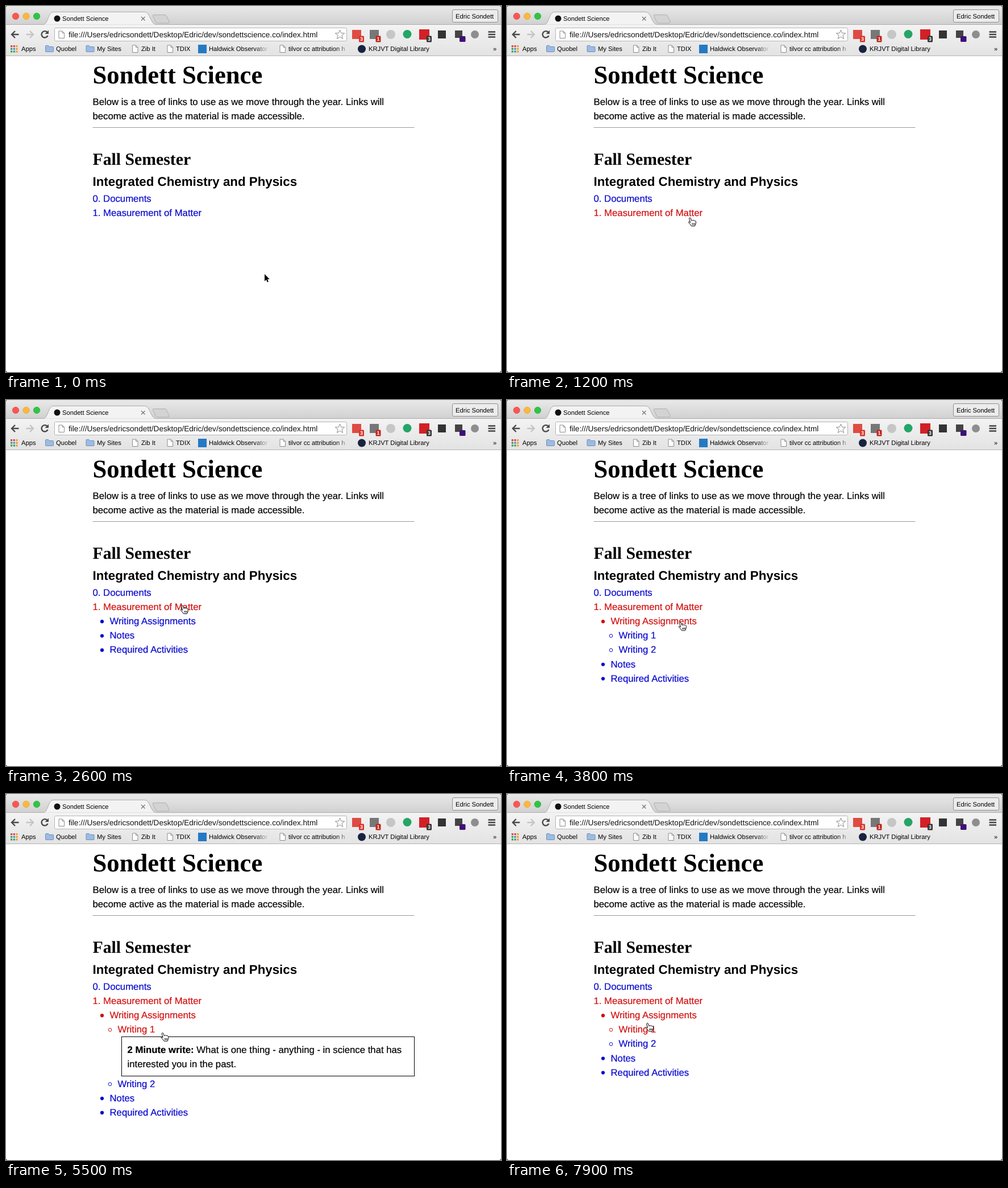
An HTML page for the animation above (8 s loop, 871 px wide and 643 px high).

```html
<!DOCTYPE html>
<html lang="en">
<head>
<meta charset="utf-8">
<title>Sondett Science</title>
<style>
  html, body { margin: 0; width: 100%; height: 100%; overflow: hidden; background: #000; }
  svg { display: block; font: 16.74px "Liberation Sans", Arial, sans-serif; text-rendering: geometricPrecision; }
  .ui { font-size: 11.2px; fill: #000; }
  .serif { font-family: "Liberation Serif", Times, serif; font-weight: bold; }
  .body { stroke: #000; stroke-width: .2; }
  .badge { font-size: 9px; font-weight: bold; fill: #fff; text-anchor: middle; }
</style>
</head>
<body>
<svg width="871" height="643" viewBox="0 0 871 643">
  <defs>
    <linearGradient id="strip" x2="0" y2="1"><stop stop-color="#e9e9e9"/><stop offset="1" stop-color="#d0d0d0"/></linearGradient>
    <linearGradient id="bar" x2="0" y2="1"><stop stop-color="#f3f3f3"/><stop offset="1" stop-color="#e3e3e3"/></linearGradient>
    <linearGradient id="fade"><stop stop-color="#e6e6e6" stop-opacity="0"/><stop offset="1" stop-color="#e6e6e6"/></linearGradient>
    <g id="page"><path d="M-4.500-6h6l3.500 3.500V6.500h-9.500z" fill="#fff" stroke="#8c8c8c"/><path d="M1.500-6v3.500h3.500" fill="none" stroke="#8c8c8c"/></g>
    <path id="folder" d="M-7-4.500q0-1 1-1h4l1.500 2h6.500q1 0 1 1v7q0 1-1 1h-12q-1 0-1-1z" fill="#9dbbe3" stroke="#6f8fbd"/>
  </defs>
  <rect width="871" height="643" rx="3" fill="#fff"/>

  <!-- window frame and tabs -->
  <path d="M0 33V3q0-3 3-3h865q3 0 3 3v30z" fill="url(#strip)"/>
  <path d="M0 33h871v54H0z" fill="url(#bar)"/>
  <path d="M0 32.500h66C74 32.500 74 10.500 83 10.500H244C254 10.500 254 32.500 264 32.500H871" fill="#f3f3f3" stroke="#acacac"/>
  <path d="M0 33h871v2H0z" fill="#f3f3f3"/>
  <path d="M260 15.500h19q3 0 4 3l4 9q1 2.500-2 2.500h-18q-3 0-4-3l-4.500-9q-1-2.500 1.500-2.500z" fill="#d3d3d3" stroke="#b0b0b0"/>
  <path d="M0 87.500h871" stroke="#b3b3b3"/>
  <g stroke-width=".7">
    <circle cx="17" cy="18" r="5.700" fill="#fc5652" stroke="#e0443e"/>
    <circle cx="35.500" cy="18" r="5.700" fill="#fdb73e" stroke="#dea032"/>
    <circle cx="54" cy="18" r="5.700" fill="#2fc543" stroke="#23a934"/>
  </g>
  <circle cx="90" cy="22" r="5.500" fill="#111"/>
  <path d="M238 19l6.500 6.500m0-6.500l-6.500 6.500" stroke="#777" stroke-width="1.300"/>
  <rect x="785.500" y="6.500" width="80" height="22" rx="2.500" fill="#ececec" stroke="#8f8f8f"/>

  <!-- toolbar -->
  <g fill="none" stroke-width="2.400">
    <path d="M22.500 50H10.500M16 44l-6 6 6 6" stroke="#4a4a4a"/>
    <path d="M35.500 50H47.500M42 44l6 6-6 6" stroke="#c4c4c4"/>
    <path d="M72.500 46A5.700 5.700 0 1 0 73.500 52" stroke="#4a4a4a"/>
    <path d="M848.500 45.500h12.500m-12.500 4.500h12.500m-12.500 4.500h12.500" stroke="#444"/>
  </g>
  <path d="M75 42.500v6.500h-6.500z" fill="#4a4a4a"/>
  <rect x="85.500" y="38.500" width="514" height="23" rx="2" fill="#fff" stroke="#b4b4b4"/>
  <use href="#page" x="97.500" y="50"/>
  <path d="M587.500 42l2.200 5.600 6 .3-4.700 3.800 1.600 5.800-5.100-3.300-5.100 3.300 1.600-5.800-4.700-3.800 6-.3z" fill="#fff" stroke="#8a8a8a"/>
  <text x="110" y="55" font-size="13.600" fill="#111">file:///Users/edricsondett/Desktop/Edric/dev/sondettscience.co/index.html</text>
  <g id="extensions">
    <rect x="609" y="42" width="16" height="16" fill="#de4b42"/>
    <rect x="640" y="42" width="16" height="16" fill="#777"/>
    <circle cx="677" cy="50" r="8" fill="#c6c6c6"/>
    <circle cx="706" cy="49.500" r="7.500" fill="#25a567"/>
    <rect x="727" y="41" width="18" height="18" fill="#d32027"/>
    <rect x="760" y="43" width="14" height="14" fill="#333"/>
    <rect x="790" y="43" width="13" height="13" fill="#444"/>
    <circle cx="825" cy="50" r="7" fill="#8e8e8e"/>
    <rect x="798" y="53" width="10.500" height="10" rx="1.500" fill="#3d1277"/>
  </g>

  <!-- bookmarks -->
  <g id="apps"></g>
  <use href="#folder" x="76.500" y="75"/>
  <use href="#folder" x="148" y="75"/>
  <use href="#page" x="227" y="75"/>
  <use href="#page" x="288.500" y="75"/>
  <rect x="338" y="68" width="15" height="15" fill="#2479c4"/>
  <use href="#page" x="486.500" y="75"/>
  <circle cx="626" cy="75.500" r="7" fill="#17233f"/>
  <g class="ui" id="labels"></g>
  <rect x="438" y="67" width="25" height="18" fill="url(#fade)"/>
  <rect x="580" y="67" width="25" height="18" fill="url(#fade)"/>

  <!-- page -->
  <text class="serif" x="152.500" y="136" font-size="44.640">Sondett Science</text>
  <g class="body">
    <text x="152.500" y="174">Below is a tree of links to use as we move through the year. Links will</text>
    <text x="152.500" y="199">become active as the material is made accessible.</text>
  </g>
  <path d="M152.500 213.500H718.500" stroke="#999"/>
  <text class="serif" x="152.500" y="279" font-size="29.760">Fall Semester</text>
  <text x="152.500" y="316" font-size="22.320" font-weight="bold">Integrated Chemistry and Physics</text>
  <g id="list"></g>
  <path id="pointer" stroke-linejoin="round"/>
</svg>
<script>
const $ = id => document.getElementById(id);

// Browser labels: text, x, baseline
$('labels').innerHTML = [
  ['Sondett Science', 99, 26], ['Edric Sondett', 791, 22],
  ['Apps', 27, 79], ['Quobel', 88, 79], ['My Sites', 160, 79], ['Zib It', 238, 79],
  ['TDIX', 299, 79], ['Haldwick Observator', 357, 79], ['tilvor cc attribution h', 497, 79],
  ['KRJVT Digital Library', 638, 79], ['»', 857, 79]
].map(([s, x, y]) => `<text x="${x}" y="${y}">${s}</text>`).join('');

$('apps').innerHTML = ['#e2453c', '#e2453c', '#ee9a35', '#35a457', '#4688f1', '#ee9a35', '#35a457', '#35a457', '#ee9a35']
  .map((c, i) => `<rect x="${8 + i % 3 * 4.7}" y="${69 + (i / 3 | 0) * 4.7}" width="3.2" height="3.2" fill="${c}"/>`).join('');

$('extensions').innerHTML += [['3', 625.5, '#d9322b'], ['1', 655, '#c0281f'], ['3', 744.5, '#333']]
  .map(([s, x, c]) => `<rect x="${x - 4.5}" y="52.5" width="9" height="11" rx="1.5" fill="${c}"/>
    <text class="badge" x="${x}" y="61.3">${s}</text>`).join('');

// Link tree: text, depth, number of clicks needed to show it
const TREE = [
  ['0. Documents', 0, 0],
  ['1. Measurement of Matter', 0, 0],
  ['Writing Assignments', 1, 1],
  ['Writing 1', 2, 2],
  ['', 3, 3],
  ['Writing 2', 2, 2],
  ['Notes', 1, 1],
  ['Required Activities', 1, 1]
];
const INDENT = [152.5, 182.5, 196.5];
const LINE = 25.1, BOX = 70.3, TOP = 326;

// Pointer stops: time, x, y
const PATH = [
  [0, 455, 471], [300, 455, 471], [1100, 320.5, 371.5], [1900, 320.5, 371.5],
  [2400, 308.5, 360.5], [2700, 308.5, 360.5], [3200, 303.5, 390], [3900, 303.5, 390],
  [4600, 251.5, 409.5], [5300, 251.5, 409.5], [6200, 430.5, 485.5], [6700, 430.5, 485.5],
  [7600, 245.5, 402], [8000, 245.5, 402]
];
const ARROW = 'M0 0V12.500L2.900 9.800 4.800 14.200 6.900 13.300 5 9H8.800z';
const HAND = 'M0 1.500Q1-.5 2.500 1L4.500 6 5.500 5Q7 4.500 7.500 5.500 9 4.500 10 6 11.500 5.500 12 7.500L11.500 11.500 10 15H4L1.500 11.500-1 9Q-1.500 7.500 0 7.500L2 9zM5.500 10v3M7.500 10v3M9.500 10v3';

function pointerAt(t) {
  const i = PATH.findIndex(p => p[0] > t);
  const [t0, x0, y0] = PATH[i - 1], [t1, x1, y1] = PATH[i];
  const u = (t - t0) / (t1 - t0), k = u * u * (3 - 2 * u);
  return [x0 + (x1 - x0) * k, y0 + (y1 - y0) * k];
}

const openLevel = t => t < 1700 ? 0 : t < 3300 ? 1 : t < 5200 ? 2 : t < 7500 ? 3 : 2;

function note(y) {
  return `<rect x="203.5" y="${Math.round(y) + .5}" width="515" height="69" fill="#fff" stroke="#000"/>
    <g class="body">
      <text x="213.5" y="${y + 28.6}"><tspan font-weight="bold">2 Minute write:</tspan> What is one thing - anything - in science that has</text>
      <text x="213.5" y="${y + 53.7}">interested you in the past.</text>
    </g>`;
}

function link(text, depth, y, color) {
  const x = INDENT[depth];
  const dot = depth == 1 ? `<circle cx="${x - 13.5}" cy="${y + 13}" r="3.1" fill="${color}"/>`
    : depth == 2 ? `<circle cx="${x - 13.5}" cy="${y + 13}" r="2.8" fill="none" stroke="${color}"/>` : '';
  return `${dot}<text x="${x}" y="${y + 18}" fill="${color}" stroke="${color}" stroke-width=".2">${text}</text>`;
}

function draw(t) {
  const [px, py] = pointerAt(t), level = openLevel(t);
  let end = TOP, over = false;
  const rows = TREE.filter(r => r[2] <= level).map(([text, depth]) => {
    const y = end;
    end += text ? LINE : BOX;
    return { text, depth, y };
  });
  // A link stays lit while the pointer is on it or anything nested in it
  $('list').innerHTML = rows.map((r, i) => {
    if (!r.text) return note(r.y);
    const next = rows.slice(i + 1).find(s => s.depth <= r.depth);
    const hit = py >= r.y && py < (next ? next.y : end);
    over ||= hit;
    return link(r.text, r.depth, r.y, hit ? '#d30f0f' : '#0808cf');
  }).join('');

  const p = $('pointer');
  p.setAttribute('d', over ? HAND : ARROW);
  p.setAttribute('fill', over ? '#fff' : '#000');
  p.setAttribute('stroke', over ? '#000' : '#fff');
  p.setAttribute('paint-order', over ? 'normal' : 'stroke');
  p.setAttribute('transform', `translate(${px} ${py})`);
}

const start = performance.now();
(function tick() {
  const t = (performance.now() - start) % 8000;
  draw(Math.floor(t / 100) * 100);
  requestAnimationFrame(tick);
})();
</script>
</body>
</html>
```
